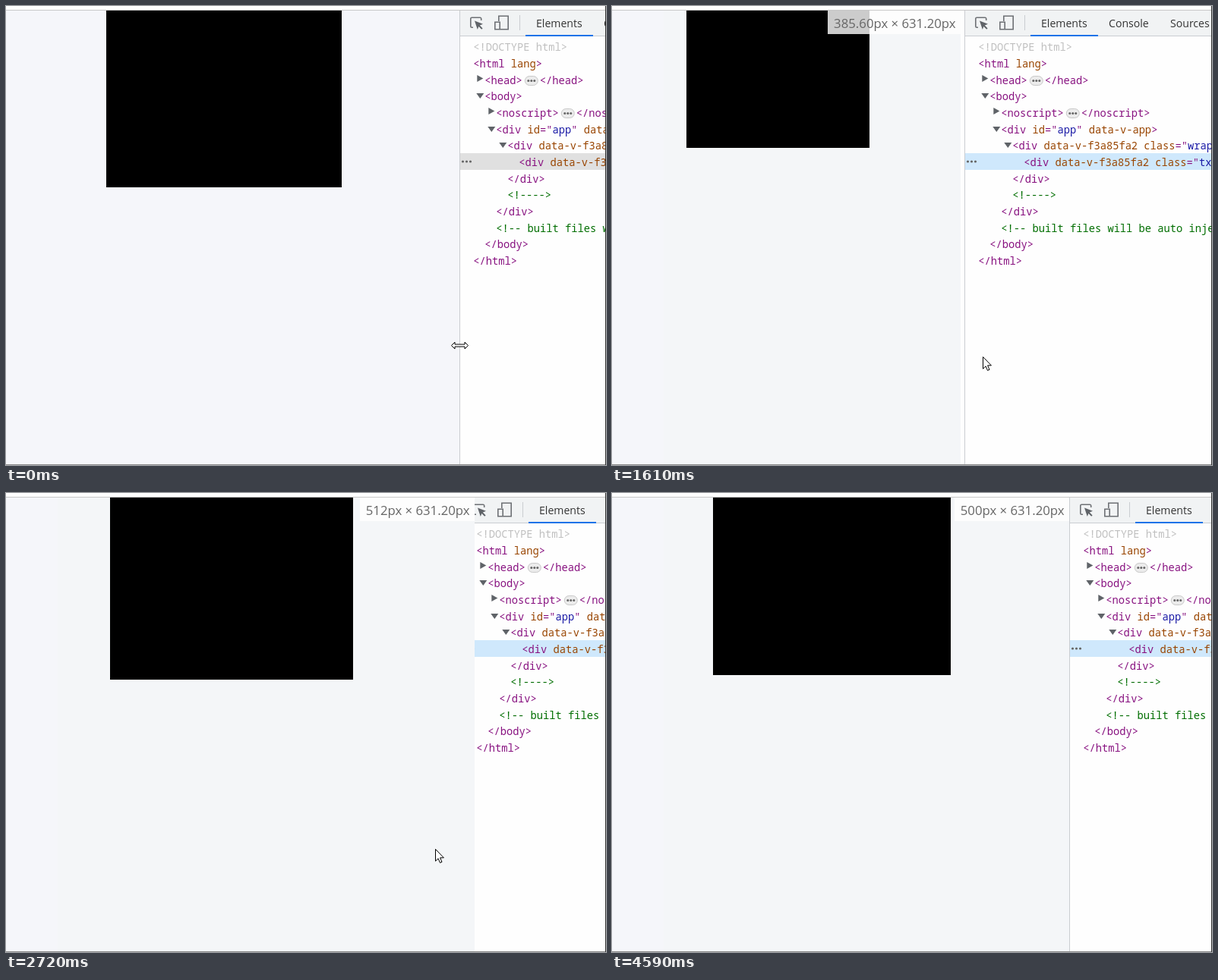
An HTML page that plays this animation: 790 px wide and 605 px high, repeating every 5.02 s.

```html
<!DOCTYPE html>
<html lang="en">
<head>
<meta charset="utf-8">
<title>Resizing panel</title>
<style>
  html, body { margin: 0; width: 100%; height: 100%; overflow: hidden; background: #fff; }
  svg { display: block; }
  text { white-space: pre; }
  .code { font: 13.745px "Noto Sans Mono", monospace; fill: #881280; }
  .attr { fill: #994500; }
  .value { fill: #1a1aa6; }
  .note { fill: #006e00; }
  .pale { fill: #c0c0c0; }
  .dim { fill: #808080; }
  .tab { font: 14.1px "Open Sans", sans-serif; fill: #333; }
  #size { font: 16.75px "Open Sans", sans-serif; fill: #666; }
</style>
</head>
<body>
<svg width="790" height="605" viewBox="0 0 790 605">
  <rect id="base" width="790" height="605"/>
  <g id="panel">
    <rect y="6" width="800" height="33" fill="#f1f3f4"/>
    <rect y="39" width="800" height="1" fill="#cacdd1"/>
    <rect y="6" width="1" height="599" fill="#cacdd1"/>
    <rect id="row" x="1" y="194" width="800" height="22"/>
    <g fill="none" stroke="#6e7175" stroke-width="1.6">
      <path d="M18 28.2H16.3a1.5 1.5 0 0 1-1.5-1.5V16.8a1.5 1.5 0 0 1 1.5-1.5H27.2a1.5 1.5 0 0 1 1.5 1.5V19"/>
      <path d="M51.8 20V13.3H64.2V30.7H54"/>
      <path d="M46.8 21.3H53.2V30.7H46.8Z"/>
    </g>
    <path d="M20 19.5L31 23.8L26.8 25.6L30.6 29.4L29.2 30.8L25.4 27L23.8 31Z" fill="#5f6368"/>
    <rect x="79" y="12" width="1" height="20" fill="#cacdd1"/>
    <rect x="87" y="38" width="89" height="2" fill="#1a73e8"/>
  </g>
  <g id="page">
    <rect id="left" y="6" height="599" fill="#f5f6fa"/>
    <rect id="right" y="6" height="599"/>
    <rect id="box" y="6"/>
    <g id="label">
      <rect id="plate" y="6" height="31" fill="#fff" fill-opacity=".8"/>
      <text id="size" y="29" text-anchor="end"></text>
    </g>
  </g>
  <rect width="790" height="5" fill="#fff"/>
  <rect y="5" width="790" height="1" fill="#c8c8c8"/>
  <rect y="604" width="790" height="1" fill="#8c8c8c"/>
  <rect x="789" width="1" height="605" fill="#333"/>
  <path id="resize" d="M-11 0L-6.5-4.5V-1.5H6.5V-4.5L11 0L6.5 4.5V1.5H-6.5V4.5Z" fill="#fff" stroke="#000"/>
  <path id="arrow" d="M.5.5V16.2L4.1 12.8L6.5 18.4L9 17.3L6.6 11.8H11.4Z" fill="#fff" stroke="#000"/>
</svg>
<script>
const LOOP = 5020, CROP = 23, CHAR = 8.247, LAST = 28;
const SELECT = 280, DRAG = 530, RELEASE = 4590;

// key points of the drag: step, value
const WIDTH = [[0, 620], [2, 580], [4, 453], [5, 453], [6, 444], [11, 600], [13, 688],
  [15, 700], [16, 640], [20, 389], [21, 364], [22, 365], [24, 475], [LAST, 625]];
const POINTER_Y = [[0, 447], [4, 437], [11, 480], [16, 470], [20, 440], [24, 472], [LAST, 550]];

// indent level, fold marker, markup
const LINES = [
  [0, '', '<!DOCTYPE html>', 'pale'],
  [0, '', '<html lang>'],
  [1, 'closed', '<head>…</head>'],
  [1, 'open', '<body>'],
  [2, 'closed', '<noscript>…</noscript>'],
  [2, 'open', '<div id="app" data-v-app>'],
  [3, 'open', '<div data-v-f3a85fa2 class="wrap">'],
  [4, '', '<div data-v-f3a85fa2 class="txt"></div> == $0'],
  [3, '', '</div>'],
  [3, '', '<!---->', 'note'],
  [2, '', '</div>'],
  [2, '', '<!-- built files will be auto injected -->', 'note'],
  [1, '', '</body>'],
  [0, '', '</html>']
];
const TABS = ['Elements', 'Console', 'Sources', 'Network', 'Performance'];

const $ = id => document.getElementById(id);
const set = (el, attrs) => { for (const k in attrs) el.setAttribute(k, attrs[k]); return el; };
const add = (parent, tag, attrs, text = '') => {
  const el = set(document.createElementNS('http://www.w3.org/2000/svg', tag), attrs);
  el.textContent = text;
  return parent.appendChild(el);
};
const show = (id, on) => set($(id), { visibility: on ? 'visible' : 'hidden' });
const panel = $('panel');

function dots(x, y, gap, r) {
  for (let i = -1; i < 2; i++) add(panel, 'circle', { cx: x + i * gap, cy: y, r, fill: '#666' });
}

function markup(x, y, str, tone) {
  const line = add(panel, 'text', { x, y, class: 'code' });
  const parts = tone ? [str] : str.split(/( [\w-]+|(?<=")[^"]+(?=")| == \$0)/);
  parts.forEach((part, i) => {
    const kind = tone || (i % 2 ? (part[1] === '=' ? 'dim' : part[0] === ' ' ? 'attr' : 'value') : '');
    add(line, 'tspan', { class: kind }, part);
  });
}

function build() {
  let tabX = 101;
  for (const name of TABS) {
    const tab = add(panel, 'text', { x: tabX, y: 28, class: 'tab' }, name);
    tabX = Math.round(tabX + tab.getComputedTextLength() + 28.5);
  }
  LINES.forEach(([level, fold, str, tone], i) => {
    let x = 18.3 + level * 15;
    const y = Math.round(59.4 + i * 21.65);
    if (fold) {
      const d = fold === 'open' ? `M${x - 11} ${y - 9}h10l-5 7z` : `M${x - 10} ${y - 12}l8 4.5l-8 4.5z`;
      add(panel, 'path', { d, fill: '#5f6368' });
    }
    str.split('…').forEach((part, j) => {
      if (j) {
        add(panel, 'rect', { x: x + 3.5, y: y - 10.5, width: 17, height: 12, rx: 6, fill: '#ececec', stroke: '#c8c8c8' });
        dots(x + 12, y - 4.5, 4, 1.5);
        x += 23;
      }
      markup(x, y, part, tone);
      x += part.length * CHAR;
    });
  });
  dots(9.5, 205, 5, 1.6);
}

// cubic curve through the points, level at every turning point
function curve(points, at) {
  const slope = i => {
    const a = points[i - 1], b = points[i], c = points[i + 1];
    return a && c && (b[1] - a[1]) * (c[1] - b[1]) > 0 ? (c[1] - a[1]) / (c[0] - a[0]) : 0;
  };
  const end = points.findIndex(p => p[0] > at);
  if (end < 0) return points[points.length - 1][1];
  const [a, u] = points[end - 1], [b, v] = points[end];
  const h = b - a, s = (at - a) / h, r = 1 - s;
  return u * r * r * (1 + 2 * s) + v * s * s * (3 - 2 * s)
    + h * s * r * (slope(end - 1) * r - slope(end) * s);
}

// the screen refreshes in steps, a little slower in the second half
function stepAt(t) {
  const n = t < 2420 ? (t - DRAG) / 135 : 14 + (t - 2420) / 144.3;
  return Math.min(LAST, Math.max(0, Math.floor(n + .15)));
}

function draw(t) {
  const n = stepAt(t), moving = t >= DRAG;
  const width = Math.round(curve(WIDTH, n));
  const edge = width - CROP, light = width < 400;
  const x = Math.round(width / 4) - CROP;

  // now and then the panel has already moved while the page lags behind
  const shrinking = curve(WIDTH, n + 1) < width;
  const lead = n && n % 8 === 0 ? (shrinking ? -16 : 5) : 0;

  set($('base'), { fill: light ? '#fafbfe' : '#fefefe' });
  set(panel, { transform: `translate(${edge + lead})` });
  set($('row'), { fill: t < SELECT ? '#e0e0e0' : '#cfe8fc' });

  const split = light ? x : 68;
  set($('left'), { width: edge });
  set($('right'), { x: split, width: edge - split, fill: light ? '#fafbfd' : moving ? '#f4f6f8' : '#f5f6fa' });
  set($('box'), {
    x, width: Math.round(width * .75) - CROP - x, height: Math.round(width * .375)
  });

  show('label', moving);
  const css = width / 1.25;
  $('size').textContent = `${Number.isInteger(css) ? css : css.toFixed(2)}px × 631.20px`;
  set($('size'), { x: edge - 6.5 });
  const plate = Math.round($('size').getComputedTextLength() + 14.3);
  set($('plate'), { x: edge - plate, width: plate });

  show('resize', !moving);
  set($('resize'), { transform: 'translate(597.5 447.5)' });
  show('arrow', moving && t < RELEASE);
  const px = Math.round(curve(WIDTH, n + .8)) - CROP - 1;
  const py = Math.round(curve(POINTER_Y, n)) - 1;
  set($('arrow'), { transform: `translate(${px} ${py})` });
}

function tick() {
  draw(performance.now() % LOOP);
  requestAnimationFrame(tick);
}

build();
tick();
</script>
</body>
</html>
```
